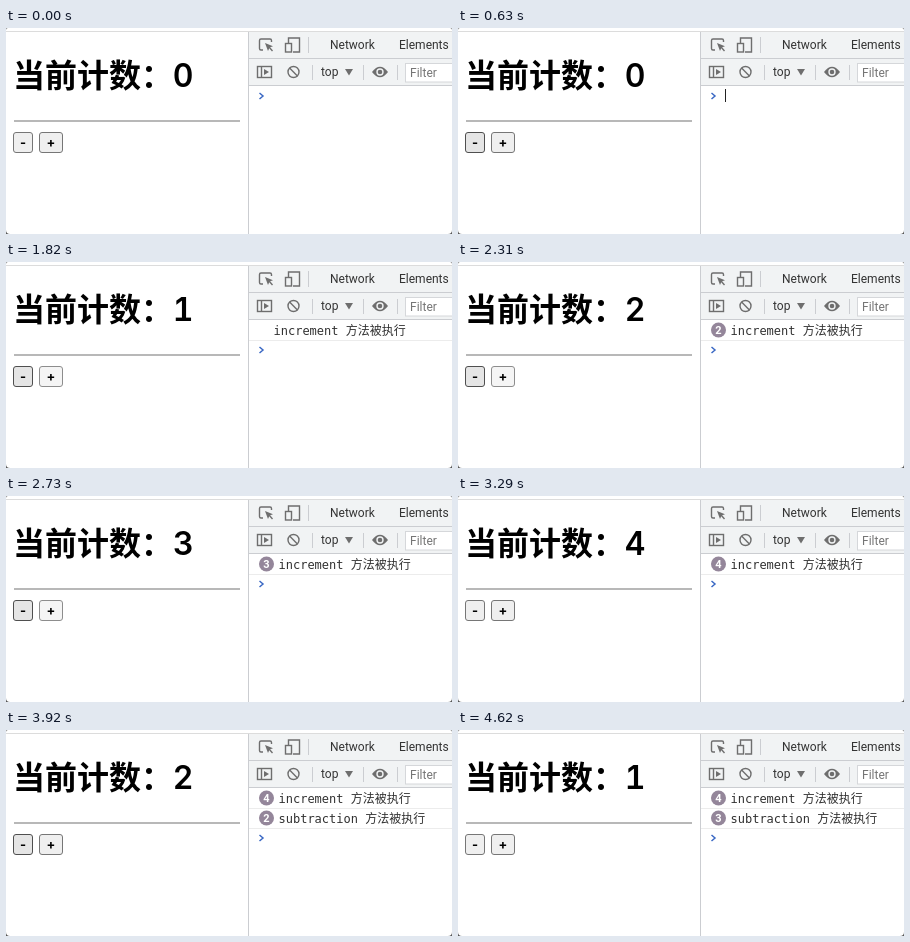
These frames come from a looping animation (446 px wide and 206 px high, 5110 ms). An HTML page:

```html
<!DOCTYPE html>
<html lang="zh-CN">
<head>
<meta charset="utf-8">
<title>Counter</title>
<style>
html, body { margin: 0; width: 100%; height: 100%; overflow: hidden; background: #fff; }
svg { display: block; }
.title { font: 700 32px "Noto Sans CJK SC", "Noto Sans CJK", sans-serif; }
.count { font: 600 32px Inter, sans-serif; font-variant-numeric: tabular-nums; text-anchor: middle; }
.btn rect { fill: #efefef; stroke: #767676; }
.btn.hover rect { fill: #e5e5e5; stroke: #4f4f4f; }
.btn.press rect { fill: #f5f5f5; stroke: #8d8d8d; }
.btn text { font: 700 13px Inter, sans-serif; text-anchor: middle; }
.tool { font: 12px Roboto, sans-serif; fill: #333; }
.icon { fill: none; stroke: #6e6e6e; stroke-width: 1.4; }
.rule { stroke: #cbcdd1; }
.log { font: 12px "DejaVu Sans Mono", "Noto Sans CJK SC", monospace; fill: #303030; }
.badge circle { fill: #94869a; }
.badge text { font: 700 11px Roboto, sans-serif; fill: #fff; text-anchor: middle; }
</style>
</head>
<body>
<svg width="446" height="206" viewBox="0 0 446 206">
  <rect width="446" height="206" fill="#fff"/>
  <path class="rule" d="M0 3.5H446" style="stroke:#dcdcdc"/>

  <text class="title" x="7" y="59">当前计数：</text>
  <text class="count" id="count" x="177" y="59">0</text>
  <path d="M8 93H234" stroke="#a0a0a0" stroke-width="1.3"/>
  <g class="btn" id="minus">
    <rect x="7.5" y="104.5" width="19" height="20" rx="2.5"/><text x="17" y="119">-</text>
  </g>
  <g class="btn" id="plus">
    <rect x="33.5" y="104.5" width="23" height="20" rx="2.5"/><text x="45" y="119">+</text>
  </g>

  <rect x="243" y="4" width="203" height="53" fill="#f1f3f4"/>
  <path class="rule" d="M242.5 4V206M243 30.5H446M243 57.5H446M302.5 9V25M306.5 37V52M357.5 37V52M391.5 37V52"/>

  <g class="icon">
    <path d="M257 22H255Q253.500 22 253.500 20.500V12.500Q253.500 11 255 11H264Q265.500 11 265.500 12.500V14"/>
    <path d="M259 15L267 18.300L263.600 19.600L262 23Z" fill="#6e6e6e" stroke="none"/>
    <path d="M263 19L266.500 23"/>
    <path d="M282.500 15V10H293.500V24H287"/>
    <rect x="279.500" y="15.500" width="6" height="8.500"/>
    <rect x="251.500" y="38.500" width="14" height="11"/>
    <path d="M255.500 38.500V49.500"/>
    <path d="M258 41V47L263 44Z" fill="#6e6e6e" stroke="none"/>
    <circle cx="287.500" cy="44" r="5.500"/>
    <path d="M283.600 40.100L291.400 47.900"/>
    <path d="M366 44Q374 33.500 382 44Q374 54.500 366 44Z" fill="#6e6e6e" stroke="none"/>
    <circle cx="374" cy="44" r="3" fill="#6e6e6e" stroke="#f1f3f4"/>
  </g>
  <path d="M339 41H347L343 47.500Z" fill="#6e6e6e"/>
  <g class="tool">
    <text x="324" y="21">Network</text>
    <text x="393" y="21">Elements</text>
    <text x="315" y="48">top</text>
    <rect x="399.500" y="35.500" width="50" height="18.500" fill="#fff" stroke="#d5d7da"/>
    <text x="404" y="49" fill="#757575">Filter</text>
  </g>

  <g id="logs"></g>
  <g id="prompt">
    <path d="M253.500 65L257 68L253.500 71" fill="none" stroke="#3a68c4" stroke-width="1.5"/>
    <path id="caret" d="M267.500 61V74" stroke="#222"/>
  </g>

  <path d="M0 202V206H4Q0 206 0 202ZM446 202V206H442Q446 206 446 202Z" fill="#555"/>
  <path d="M0 2V0H2Q0 0 0 2ZM446 2V0H444Q446 0 446 2Z" fill="#777"/>
</svg>
<script>
const LOOP = 5110, ROW = 20;
const $ = id => document.getElementById(id);

// [press, release] times
const clicks = {
  plus: [[1400, 1540], [1820, 1960], [2310, 2450], [2730, 2870]],
  minus: [[3500, 3640], [3850, 3920], [4130, 4270]]
};
// [enter, leave] times
const hovers = {
  plus: [[1190, 3290]],
  minus: [[140, 3290], [3360, 4620]]
};

const within = (spans, t) => spans.some(([a, b]) => t >= a && t < b);
const done = (id, t) => clicks[id].filter(c => t >= c[1]).length;

function logRow(name, y) {
  const g = document.createElementNS("http://www.w3.org/2000/svg", "g");
  g.setAttribute("transform", `translate(0 ${y})`);
  g.innerHTML = `<path d="M243 20.500H446" stroke="#ececec"/>
    <g class="badge"><circle cx="260.500" cy="10" r="7.500"/><text x="260.500" y="14"></text></g>
    <text class="log" y="15">${name} 方法被执行</text>`;
  $("logs").append(g);
  const [badge, label] = [g.querySelector(".badge"), g.querySelector(".log")];
  return n => {
    g.style.display = n ? "" : "none";
    badge.style.display = n > 1 ? "" : "none";
    badge.lastChild.textContent = n;
    label.setAttribute("x", n > 1 ? 272.5 : 267.5);
  };
}
const showAdds = logRow("increment", 58);
const showSubs = logRow("subtraction", 58 + ROW);

function setButton(id, t) {
  const state = within(clicks[id], t) ? " press" : within(hovers[id], t) ? " hover" : "";
  $(id).setAttribute("class", "btn" + state);
}

function draw(t) {
  const adds = done("plus", t), subs = done("minus", t);
  $("count").textContent = adds - subs;
  showAdds(adds);
  showSubs(subs);
  setButton("plus", t);
  setButton("minus", t);
  $("prompt").setAttribute("transform", `translate(0 ${ROW * ((adds > 0) + (subs > 0))})`);
  $("caret").style.display = t >= 630 && t < 1190 ? "" : "none";
}

const start = performance.now();
function tick() {
  draw((performance.now() - start) % LOOP);
  requestAnimationFrame(tick);
}
tick();
</script>
</body>
</html>
```
